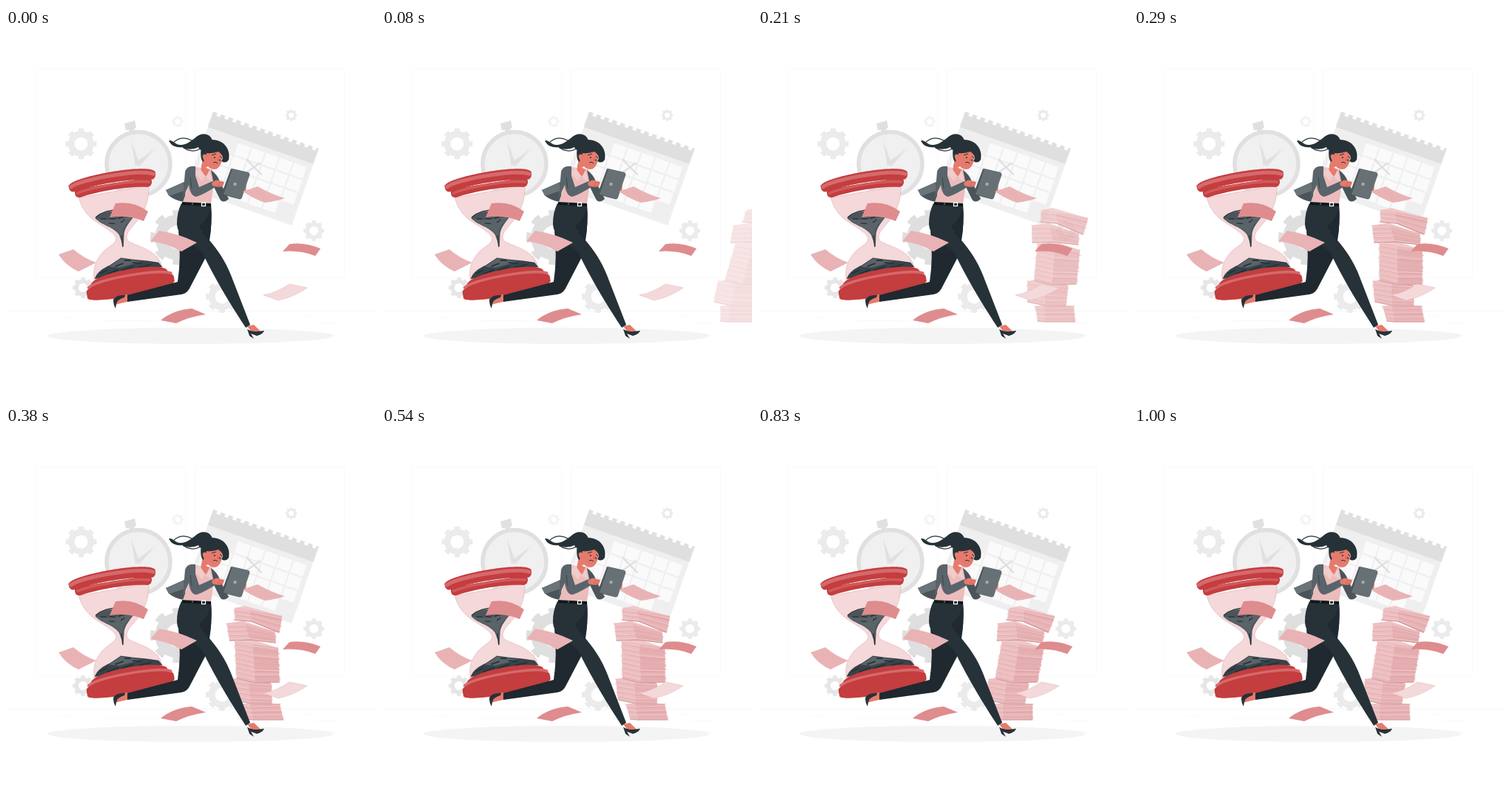
An HTML page that plays this animation: 500x500 px, repeating every 1.04 s.

```html
<!DOCTYPE html>
<html lang="en">
<head>
<meta charset="utf-8">
<title>Running late</title>
<style>
  html, body { margin: 0; width: 100%; height: 100%; overflow: hidden; background: #fff; }
  svg { display: block; width: 100vw; height: 100vh; }
</style>
</head>
<body>
<svg viewBox="0 0 500 500" fill="none">
  <!-- room -->
  <g stroke="#fafafa">
    <path d="M39.500 55.500H242.500V337.500H39.500ZM255.500 55.500H457.500V337.500H255.500Z"/>
    <path d="M0 382.500H500" stroke="#f6f6f6"/>
    <path d="M70 391.500H97M135 395.500H205M399 389.500H416M417 398.500H448"/>
  </g>
  <ellipse cx="249.500" cy="416" rx="193.500" ry="11" fill="#f4f4f4"/>
  <g id="gears"></g>

  <!-- stopwatch -->
  <path d="M160 129L174 125L176 135L162 138.500ZM166 137L173 135.500L175 143L168 144Z" fill="#e0e0e0"/>
  <circle cx="179" cy="183.500" r="43" fill="#f0f0f0" stroke="#e0e0e0" stroke-width="5.500"/>
  <path d="M169 152L180 182L175 187Z M175 182L201 163L180 187Z" fill="#e0e0e0"/>

  <!-- calendar -->
  <g transform="translate(280 113) rotate(19.300)">
    <path d="M0 0H151V110H0Z" fill="#efefef"/>
    <path d="M0 0H151V22H0Z" fill="#dfdfdf"/>
    <path d="M6 1H151" stroke="#fff" stroke-width="6" stroke-dasharray="5 6.400"/>
    <g id="cells" fill="#fafafa"></g>
    <path d="M64 46L90 59M83 44L70 62" stroke="#e0e0e0" stroke-width="2.500"/>
  </g>

  <g id="stack"></g>

  <!-- hourglass -->
  <g transform="translate(156 280) rotate(-10)">
    <path d="M-48 -60C-45 -31 -28 -23 -18 -12C-11 -5 -7 0 -8 4C-10 11 -24 13 -32 21C-44 32 -46 42 -47 55H47C46 42 44 38 36 30C27 20 10 14 7 8C5 2 9 -2 13 -6C27 -17 44 -30 48 -60Z" fill="#f4d8da" stroke="#e9b7ba" stroke-width=".7"/>
    <path d="M-31 -29C-18 -37 -5 -36 24 -26C20 -19 8 -13 4 -2L0 16L-3 -1C-8 -13 -25 -18 -31 -29Z" fill="#4b5559"/>
    <path d="M-31 -29C-18 -21 14 -20 24 -26C16 -16 4 -13 2 -2L0 13L-2 -2C-7 -13 -25 -20 -31 -29Z" fill="#5a6367"/>
    <path d="M-30 -30C-18 -37 -5 -36 6 -34M-24 -27L-16 -25M-12 -25L-4 -23M0 -23L10 -25M-14 -19L-6 -17M2 -17L8 -20M0 0L-1 16" stroke="#263238" stroke-width="1.300"/>
    <path d="M-46 52C-41 43 -33 40 -22 37L-6 30L10 35L28 40L43 45L47 52Z" fill="#37434a"/>
    <path d="M-24 39L-6 31L10 36L20 40L-10 43Z" fill="#5a6367"/>
    <path d="M-38 46L-27 43M-28 48L-12 45M-16 40L-4 38M-8 47L8 44M8 39L20 42M16 47L33 46M-2 34L7 36" stroke="#222e34" stroke-width="1.600"/>
    <!-- base -->
    <path d="M-60 69C-60 51 60 51 60 67V73C58 86 -58 86 -60 76Z" fill="#c43d3f"/>
    <path d="M-53 61C-54 43 54 43 53 59Z" fill="#c43d3f"/>
    <path d="M-56 62C-42 53 42 53 57 62" stroke="#d6696b" stroke-width="3.500" stroke-linecap="round"/>
    <!-- lid -->
    <path d="M-52 -72V-64Q-51 -60 -46 -60C-20 -64 20 -64 46 -58Q52 -58 53 -64V-70Z" fill="#c43d3f"/>
    <path d="M-50 -66C-30 -71 30 -71 51 -64" stroke="#cf5a5c" stroke-width="3.500"/>
    <path d="M-59 -77C-57 -90 57 -90 60 -76Q60 -69 55 -67C20 -74 -20 -74 -54 -69Q-59 -70 -59 -77Z" fill="#c43d3f"/>
    <path d="M-56 -76C-40 -84 40 -84 57 -74" stroke="#d6696b" stroke-width="5" stroke-linecap="round"/>
  </g>

  <!-- trailing leg -->
  <path d="M164 360Q154 362 147 366L148 374Q154 372 164 370Z" fill="#e57b6c"/>
  <path d="M161 361Q149 360 145 367Q145 374 148 379L149 373Q150 367 160 364Z" fill="#263238"/>
  <path d="M233 274Q237 310 232 343L164 361V370L237 360Q245 359 249 350L274 302Z" fill="#1f292f"/>
  <!-- leading leg -->
  <path d="M326 403L335 401L344 410L333 412Z" fill="#e57b6c"/>
  <path d="M326 407Q333 412 349 409Q347 414 339 416L331 413L335 420L329 416Z" fill="#263238"/>
  <path d="M237 237H277Q279 262 275 287C287 301 297 316 304 334L330 401L324 405C290 353 276 325 265 303C254 292 231 284 231 264Q231 249 237 237Z" fill="#263238"/>
  <path d="M277 241Q279 268 274 289Q267 278 261 268Q273 260 277 241Z" fill="#1f292f"/>

  <!-- torso -->
  <path d="M243 207L216 219L222 228Q231 234 242 235Z" fill="#4a5459"/>
  <path d="M240 209L216 219L220 227L241 220Z" fill="#6b7478"/>
  <path d="M255 188L278 191Q283 205 277 237L239 235Q248 212 247 196Z" fill="#ecbcbc"/>
  <path d="M264 186L275 191L271 200L263 197Z" fill="#e57b6c"/>
  <path d="M261 188L254 195L265 207L269 200ZM275 193L270 202L279 208Z" fill="#f0cccc"/>
  <path d="M277 192Q286 198 289 208L301 231Q293 238 289 231L282 217Z" fill="#4a5459"/>
  <path d="M256 187Q245 185 242 194L239 230L247 212Q249 227 257 228Q265 226 286 213L279 207L261 215L256 200Z" fill="#59646a"/>
  <path d="M249 202L251 216" stroke="#3c474c"/>
  <path d="M238 235L277 237V241L238 239Z" fill="#10171b"/>
  <rect x="264.500" y="236" width="5" height="4.500" stroke="#fff" stroke-width="1.300"/>
  <path d="M252 236V239" stroke="#bbb" stroke-width=".7"/>
  <path d="M319 215L325 213L324 221L317 223Z" fill="#e57b6c"/>
  <path d="M304 190L327 195Q330 196 329 199L318 230Q317 232 314 231L291 225Z" fill="#4b555a"/>
  <path d="M306 190L327 195Q330 196 329 199L319 229Q318 232 315 231L294 225Z" fill="#667075"/>
  <circle cx="309.500" cy="211" r="2.200" fill="#a4abae"/>
  <path d="M278 210Q283 204 287 206L295 208L293 214Q286 216 279 213Z" fill="#e57b6c"/>
  <path d="M287 209L294 210M285 212L292 213" stroke="#c9574e" stroke-width=".6"/>

  <!-- head -->
  <path d="M279 152C275 141 263 141 255 149C248 154 243 158 236 158C229 158 226 151 220 152C223 160 232 162 238 161C243 165 255 164 260 161C262 167 267 166 270 158Z" fill="#263238"/>
  <path d="M227 154Q238 145 251 152M239 161Q251 170 263 163" stroke="#263238" stroke-width="1.200"/>
  <path d="M267 171Q267 161 280 162Q293 164 292 177Q290 190 282 191Q276 191 273 187L268 190L264 187Z" fill="#e57b6c"/>
  <path d="M264 177C261 158 268 151 279 151C295 151 304 165 301 178Q297 184 291 180Q296 173 287 167Q278 170 271 169Q270 178 266 181Z" fill="#263238"/>
  <ellipse cx="269" cy="175" rx="3" ry="4.500" transform="rotate(-18 269 175)" fill="#e57b6c"/>
  <path d="M278 172L284 170M289 173L292 176M280 182Q283 180 286 183" stroke="#263238" stroke-width="1"/>
  <path d="M286 176L287 180" stroke="#c9574e" stroke-width=".8"/>
  <circle cx="282" cy="175" r="1" fill="#263238"/>
  <circle cx="289" cy="178.500" r="1" fill="#263238"/>

  <!-- loose sheets -->
  <path d="M320 221L340 214Q357 224 377 230Q365 234 350 236Q335 231 320 221Z" fill="#e9b3b5"/>
  <path d="M148 237Q173 233 192 248L186 261Q166 252 140 256Z" fill="#de8c8e"/>
  <path d="M207 274Q231 277 258 290L237 302Q215 290 195 288Z" fill="#e9b3b5"/>
  <path d="M71 306L91 299Q105 311 122 317L98 329Q80 321 71 306Z" fill="#e9b3b5"/>
  <path d="M209 395Q226 381 251 379L270 387Q248 390 230 399Z" fill="#de8c8e"/>
  <path d="M383 292Q404 289 425 298L418 308Q397 300 374 302Z" fill="#de8c8e"/>
  <path d="M348 361Q365 358 383 346L407 351Q388 364 368 368Z" fill="#f4d9da" stroke="#ebbcbf" stroke-width=".6"/>
</svg>

<script>
const get = id => document.getElementById(id);
const stack = get("stack");

// Gears: x, y, outer radius, colour
const gears = [
  [101.5, 156.5, 21, "#ebebeb"], [232, 126.5, 8, "#f4f4f4"], [385.5, 118, 8, "#ebebeb"],
  [416, 274, 14, "#ebebeb"], [104, 351, 14, "#e6e6e6"], [232, 283, 37, "#dfdfdf"],
  [292, 363, 22, "#ebebeb"]
];
get("gears").innerHTML = gears.map(([x, y, r, color]) => `
  <g stroke="${color}">
    <circle cx="${x}" cy="${y}" r="${r * .63}" stroke-width="${r * .4}"/>
    <circle cx="${x}" cy="${y}" r="${r * .89}" stroke-width="${r * .22}" pathLength="16"
      stroke-dasharray="1" stroke-dashoffset=".5"/>
  </g>`).join("");

let cells = "";
for (let row = 0; row < 4; row++)
  for (let col = 0; col < 7; col++) {
    if ((!row && col < 2) || (row === 3 && col > 5)) continue;
    cells += `<rect x="${6 + col * 20}" y="${29 + row * 18.7}" width="18" height="16.500" rx="1"/>`;
  }
get("cells").innerHTML = cells;

let seed = 7;
const random = () => (seed = seed * 16807 % 2147483647) / 2147483647;
const jitter = size => (random() - .5) * size;

// A pile: left, middle and right corners of its top and bottom edges
function pile(top, bottom, back) {
  const [a, b, c] = top, [d, e, f] = bottom;
  let out = `<path d="M${a}L${back}L${c}L${b}Z" fill="#efc8ca"/>
    <path d="M${a}L${b}L${e}L${d}Z" fill="#eec3c4"/>
    <path d="M${b}L${c}L${f}L${e}Z" fill="#e8b2b4"/>`;
  const count = Math.round((d[1] - a[1]) / 2.1);
  for (let i = 0; i <= count; i++) {
    const at = k => [0, 1].map(n => top[k][n] + (bottom[k][n] - top[k][n]) * i / count);
    const [l, m, r] = [at(0), at(1), at(2)];
    l[0] += jitter(3.5);
    r[0] += jitter(3.5);
    const tone = ["#e9b8ba", "#eec5c6", "#e4a9ab"][i % 3];
    out += `<path d="M${l}L${m}L${r}" stroke="${tone}" stroke-width=".9"/>`;
    if (random() < .3)
      out += `<path d="M${m}L${r}" stroke="#d9999c" stroke-width=".6"/>`;
  }
  return out + `<path d="M${d}L${e}L${f}" stroke="#cf9799" stroke-width="1.200"/>`;
}
stack.innerHTML =
  pile([[320, 376], [332, 377], [372, 376]], [[322, 396], [332, 397], [373, 397]], [345, 372]) +
  pile([[312, 342], [336, 345], [367, 348]], [[310, 370], [333, 375], [362, 375]], [335, 338]) +
  pile([[329, 291], [352, 295], [386, 300]], [[321, 341], [345, 347], [378, 346]], [352, 288]) +
  pile([[323, 267], [347, 267], [386, 278]], [[322, 290], [350, 289], [384, 293]], [345, 263]) +
  pile([[338, 246], [357, 249], [400, 257]], [[335, 262], [357, 264], [392, 279]], [353, 243]);

const curve = (u, p, q) => 3 * u * (1 - u) * ((1 - u) * p + u * q) + u ** 3;

// cubic-bezier(.36, -.01, .5, 1.38), which overshoots its end
function ease(x) {
  let low = 0, high = 1;
  for (let i = 0; i < 24; i++) {
    const mid = (low + high) / 2;
    if (curve(mid, .36, .5) < x) low = mid; else high = mid;
  }
  return curve(low, -.01, 1.38);
}

function draw(now) {
  const step = Math.min(24, Math.floor(now % 1040 * .024 + .1));
  const time = step ? Math.min(1000, 135 + step * 36.5) : 0;
  let shift = 0, skew, opacity = 1;
  if (time < 600) {
    const k = ease(time / 600);
    shift = 250 * (1 - k);
    skew = -20 + 30 * k;
    opacity = Math.max(0, Math.min(1, k));
  } else if (time < 800) {
    skew = 10 - 12 * ease((time - 600) / 200);
  } else {
    skew = -2 + 2 * ease((time - 800) / 200);
  }
  stack.setAttribute("transform", `translate(${356 + shift} 320) skewX(${skew}) translate(-356 -320)`);
  stack.setAttribute("opacity", opacity);
}

function loop() {
  draw(performance.now());
  requestAnimationFrame(loop);
}
loop();
</script>
</body>
</html>
```
